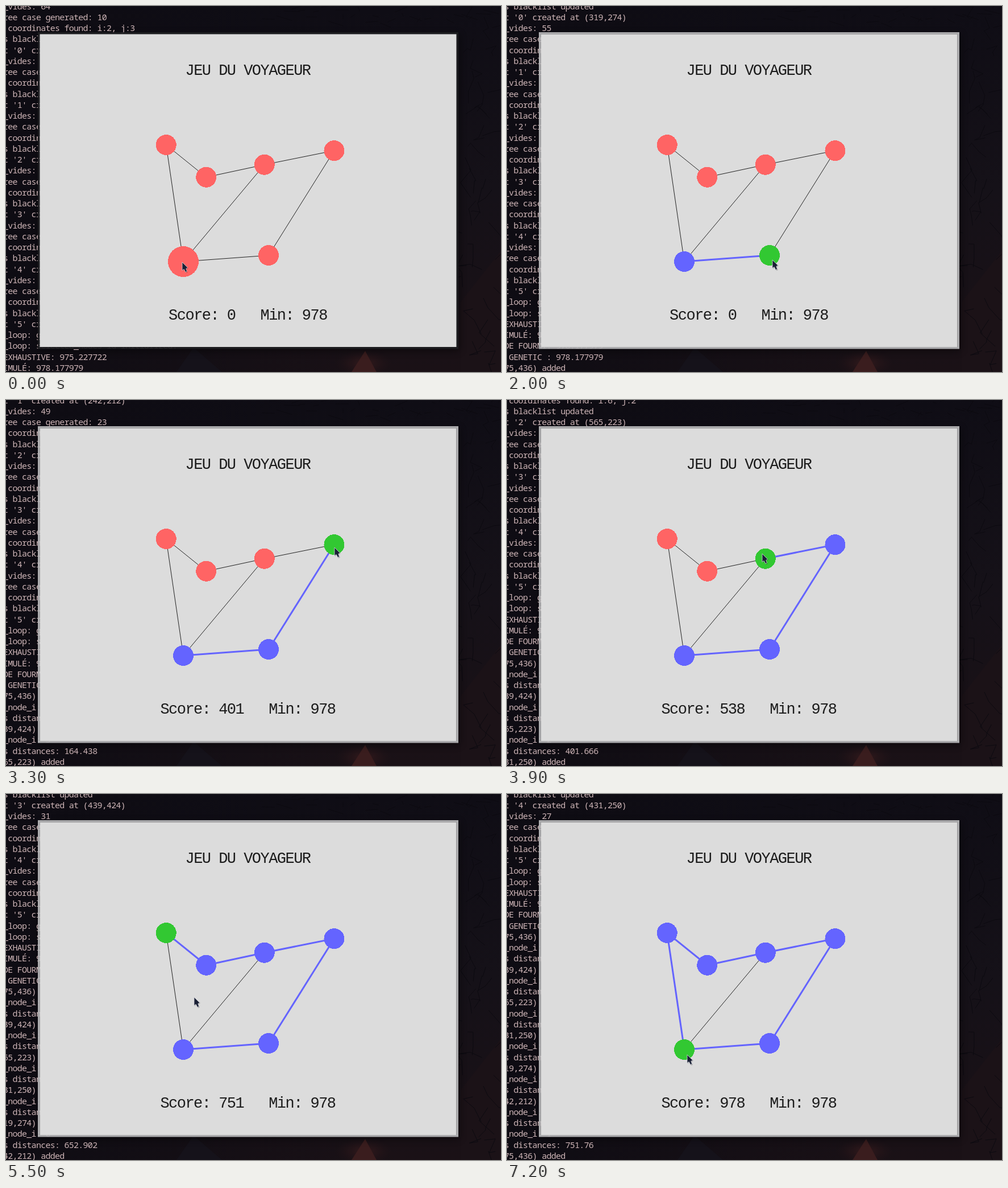
These frames come from a looping animation (871 px wide and 643 px high, 8 s). An HTML page:

```html
<!DOCTYPE html>
<html lang="fr">
<head>
<meta charset="utf-8">
<title>Jeu du voyageur</title>
<style>
  html, body { margin: 0; width: 100%; height: 100%; overflow: hidden; background: #0e0c13; }
  svg { display: block; width: 100%; height: 100%; }
  text { white-space: pre; }
  #log { font: 500 15px "Noto Sans Mono", "DejaVu Sans Mono", monospace; letter-spacing: -.73px; fill: #cdb4b6; }
  #title, #score {
    font: 27px "Liberation Mono", monospace; letter-spacing: -1.53px;
    fill: #1c1c1c; text-anchor: middle;
  }
  circle { shape-rendering: crispEdges; }
</style>
</head>
<body>
<svg viewBox="0 0 871 643">
  <defs>
    <linearGradient id="dusk" x2="0" y2="1">
      <stop offset="0" stop-color="#0f0d15"/>
      <stop offset=".5" stop-color="#151118"/>
      <stop offset="1" stop-color="#1a1116"/>
    </linearGradient>
    <linearGradient id="shade">
      <stop offset="0" stop-color="#0e0c13"/>
      <stop offset=".8" stop-color="#0e0c13" stop-opacity="0"/>
    </linearGradient>
    <radialGradient id="glow">
      <stop offset="0" stop-color="#341a1c"/>
      <stop offset="1" stop-color="#241418" stop-opacity="0"/>
    </radialGradient>
  </defs>
  <rect width="871" height="643" fill="url(#dusk)"/>
  <rect width="871" height="643" fill="url(#shade)"/>
  <path d="M300 643L330 600L380 643Z" fill="#15121a"/>
  <path d="M800 643V520L871 430V643Z" fill="#1b1217"/>
  <path id="cracks" fill="none" stroke="#0c0a10"/>
  <ellipse cx="630" cy="628" rx="50" ry="24" fill="url(#glow)"/>
  <path d="M608 643L632 606L652 643Z" fill="#3a1d1e"/>

  <rect x="58" y="50" width="740" height="556" opacity=".45" style="filter:blur(7px)"/>
  <g id="log"></g>
  <rect id="border" x="57.75" y="47.75" width="736.5" height="553" fill="none" stroke-width="3.5" stroke-opacity=".93"/>
  <rect x="59.5" y="49.5" width="733" height="549.5" fill="#dcdcdc"/>
  <text id="title" x="425.5" y="120.5">JEU DU VOYAGEUR</text>
  <g id="graph"></g>
  <text id="score" x="425.5" y="551"></text>
  <g id="cursor">
    <path d="M1 2V16L4 13L7 19L10 18L8 13L11 10Z" opacity=".2"/>
    <path d="M0 0V14.5L3.2 12.5L5.8 17.5L8.6 16.2L6.8 11.6L9.6 9.6Z" fill="#1a2035" stroke="#d5d5dc" stroke-width=".8"/>
  </g>
</svg>
<script>
const LOOP = 8000, STEP = 100, ROWS = 34, LINE = 19.25;
const LOG_DELAY = 60;   // a click recolours its city first, then the log and score follow
const RED = '#ff6464', GREEN = '#32c832', BLUE = '#6464ff';
const $ = id => document.getElementById(id);

// Cities in board units, in order of creation, with the free cells left at that point.
const cities = {
  B: { x: 319, y: 274, free: 64 }, A: { x: 242, y: 212, free: 55 }, D: { x: 565, y: 223, free: 49 },
  E: { x: 439, y: 424, free: 40 }, C: { x: 431, y: 250, free: 31 }, F: { x: 275, y: 436, free: 27 }
};
const names = Object.keys(cities);
const edges = ['AB', 'BC', 'CD', 'DE', 'EF', 'AF', 'CF'];
const clicks = { 790: 'F', 1990: 'E', 3230: 'D', 3830: 'C', 4990: 'B', 5430: 'A', 6330: 'miss', 7090: 'F' };

// Pointer moves: departure, arrival, destination.
const moves = [
  [0, 0, 310, 450], [900, 1000, 312, 448], [1100, 2000, 467, 446], [2200, 2600, 556, 333],
  [3200, 3300, 578, 259], [3800, 3900, 449, 270], [4100, 4700, 352, 293],
  [5400, 5500, 331, 357], [5600, 6100, 321, 468], [7000, 7100, 317, 458]
];

const clamp = p => Math.min(1, Math.max(0, p));
const screen = name => ({ x: cities[name].x * .9155 + 60.2, y: cities[name].y * .9155 + 49.9 });
const distance = (a, b) => Math.hypot(a.x - b.x, a.y - b.y);

const log = [];      // { time, line }
const scores = [];   // { time, sum }

function simulate() {
  const print = (time, ...lines) => log.push(...lines.map(line => ({ time, line })));
  names.forEach((name, i) => {
    const { x, y, free } = cities[name];
    print(0, `_vides: ${free}`, `ree case generated: ${Math.round(10 + 6.5 * i)}`,
      ` coordinates found: i:${Math.floor((x - 100) / 75)}, j:${Math.floor(y / 80)}`,
      's blacklist updated', `t '${i}' created at (${x},${y})`);
  });
  print(0, '_loop: graph generated.', '_loop: selected_nodes id initialized.',
    'EXHAUSTIVE: 975.227722', 'IMULÉ: 978.177979');

  let last, sum = 0;
  for (const [click, name] of Object.entries(clicks)) {
    const time = +click + LOG_DELAY, city = cities[name];
    if (last) print(time, `_node_i: ${names.indexOf(last)}`, `s distances: ${+sum.toFixed(3)}`);
    else print(time, 'DE FOURMI: 978.177979', ' GENETIC : 978.177979');
    if (!city) continue;
    print(time, `${city.x},${city.y}) added`.slice(1));
    if (last) sum += distance(cities[last], city);
    scores.push({ time, sum });
    last = name;
  }
}

function paintCracks() {
  let seed = 7;
  const random = () => (seed = seed * 16807 % 2147483647) / 2147483647;
  let d = '';
  for (let i = 0; i < 34; i++) {
    d += `M${800 + 60 * random()} ${i * 19}`;
    for (let k = 0; k < 3; k++) d += `l${44 * random() - 20} ${34 * random() - 8}`;
    d += `M${450 + 13 * i} ${30 * random()}l${30 * random()} ${20 * random() - 10}`;
  }
  $('cracks').setAttribute('d', d);
}

function pointerAt(t) {
  let x, y;
  for (const [from, to, toX, toY] of moves) {
    if (t < from) break;
    const p = to > from ? Math.sin(clamp((t - from) / (to - from)) * Math.PI / 2) : 1;
    x = p === 1 ? toX : x + (toX - x) * p;
    y = p === 1 ? toY : y + (toY - y) * p;
  }
  return { x, y };
}

function drawGraph(t, pointer) {
  const path = Object.keys(clicks).filter(time => time <= t)
    .map(time => clicks[time]).filter(name => cities[name]).join('');
  const walked = ([a, b]) => path.includes(a + b) || path.includes(b + a);
  const lines = edges.map(edge => {
    const a = screen(edge[0]), b = screen(edge[1]);
    const style = walked(edge) ? `stroke="${BLUE}" stroke-width="3"` : 'stroke="#000" stroke-width=".85"';
    return `<line x1="${a.x}" y1="${a.y}" x2="${b.x}" y2="${b.y}" ${style}/>`;
  });
  const discs = names.map(name => {
    const { x, y } = screen(name), visited = path.includes(name);
    const radius = !visited && distance(pointer, { x, y }) < 14 ? 27 : 18;
    const fill = path.endsWith(name) ? GREEN : visited ? BLUE : RED;
    return `<circle cx="${x}" cy="${y}" r="${radius}" fill="${fill}"/>`;
  });
  $('graph').innerHTML = lines.join('') + discs.join('');
}

function draw(t) {
  const pointer = pointerAt(t);
  drawGraph(t, pointer);
  $('log').innerHTML = log.filter(entry => entry.time <= t).slice(-ROWS)
    .map(({ line }, row) => `<text x="-5" y="${row * LINE + 5.5}">${line}</text>`).join('');
  const score = scores.filter(entry => entry.time <= t).pop()?.sum ?? 0;
  $('score').textContent = `Score: ${Math.floor(score)}   Min: 978`;
  const grey = 30 + 153 * clamp((t - 100) / 200);
  $('border').setAttribute('stroke', `rgb(${grey} ${grey} ${grey + 3})`);
  $('cursor').setAttribute('transform', `translate(${pointer.x} ${pointer.y})`);
}

simulate();
paintCracks();
let start, shown = 0;
function tick(now) {
  start ??= now;
  const t = Math.floor((now - start) % LOOP / STEP) * STEP;
  if (t !== shown) draw(shown = t);
  requestAnimationFrame(tick);
}
draw(shown);
requestAnimationFrame(tick);
</script>
</body>
</html>
```
